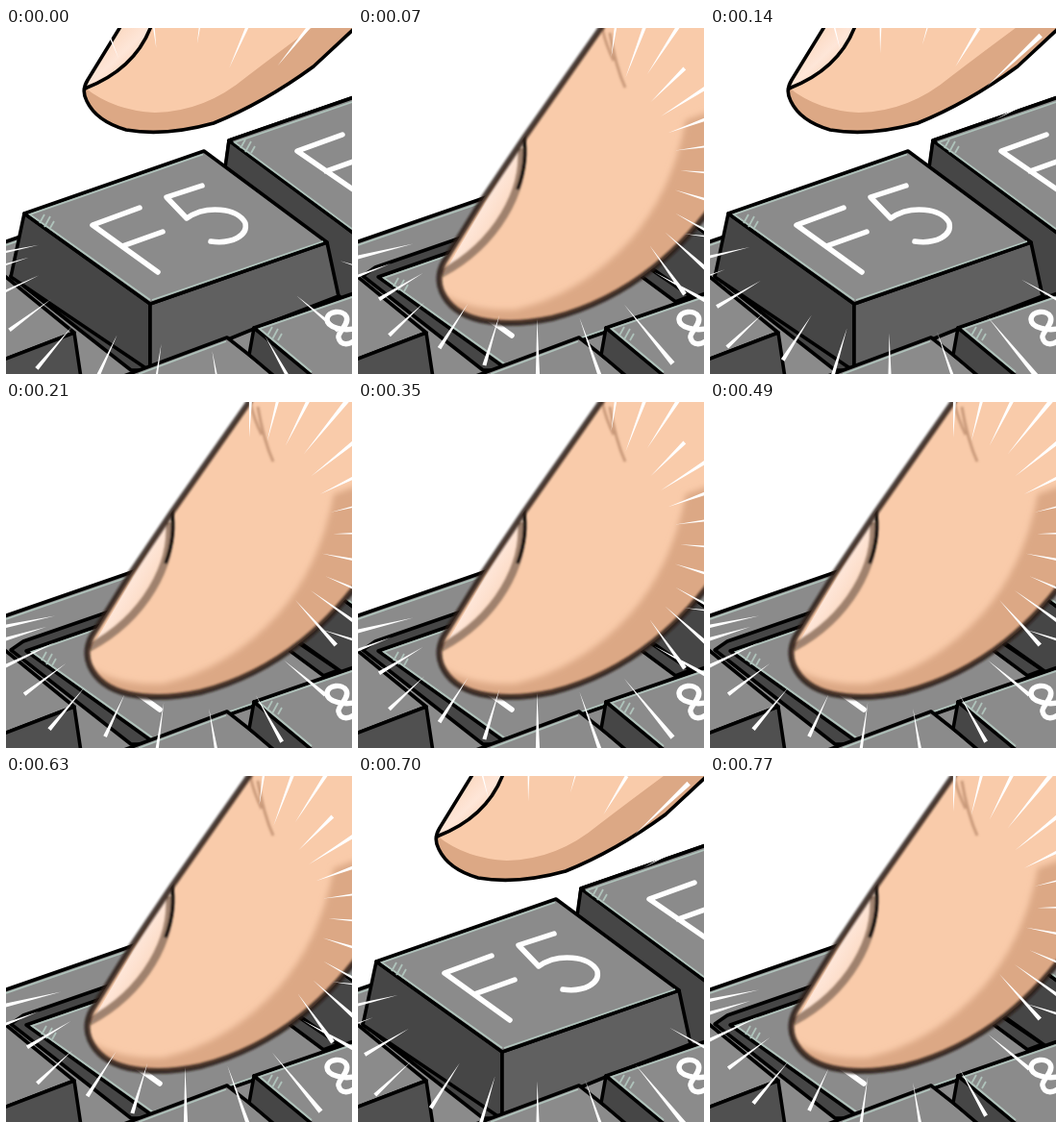
An HTML page that plays this animation: 360 px wide and 360 px high, repeating every 0.84 s.

```html
<!DOCTYPE html>
<html lang="en">
<head>
<meta charset="utf-8">
<title>Refresh key</title>
<style>
  html, body { margin: 0; width: 100%; height: 100%; overflow: hidden; background: #fff; }
  svg { display: block; width: 100vw; height: 100vh; }
  .ink { stroke: #000; stroke-width: 3.6; stroke-linejoin: round; stroke-linecap: round; }
  .line { fill: none; }
  .top { fill: #8b8b8b; }
  .front { fill: #606060; }
  .side { fill: #464646; }
  .shine { fill: none; stroke: #afc3bb; stroke-width: 1.8; }
  .glyph { fill: none; stroke: #fff; stroke-width: 5.5; stroke-linecap: round; stroke-linejoin: round; }
  .skin { fill: #f9cbaa; }
  .shade { fill: #dca885; }
</style>
</head>
<body>
<svg viewBox="0 0 360 360">
  <defs>
    <linearGradient id="nail" x1="0" y1="0" x2="1" y2="1">
      <stop offset=".2" stop-color="#fbd5bb"/>
      <stop offset=".5" stop-color="#fee6d8"/>
      <stop offset=".85" stop-color="#f9cbaa"/>
    </linearGradient>
    <filter id="soft"><feGaussianBlur stdDeviation="1.2"/></filter>
    <filter id="softer"><feGaussianBlur stdDeviation="3"/></filter>
    <path id="upShape" d="M128-16 L85 54 Q78 65 84 76 Q94 97 125 106 Q166 113 216 99 Q268 78 320 40 L380 -16Z"/>
    <path id="downShape" d="M264-16 L173 114 L130 178 L89 244 Q81 259 87 274 Q97 297 128 304 Q160 311 202 302 Q260 287 308 249 Q345 220 380 170 V-16Z"/>
    <clipPath id="upClip"><use href="#upShape"/></clipPath>
    <clipPath id="downClip"><use href="#downShape"/></clipPath>
    <path id="hatch" class="shine" stroke-width="2.500" d="M0 9 L5 0 M5 13 L11 2 M11 14 L15 7"/>
    <g id="cap">
      <path class="ink top" d="M19 193 L206 128 L334 223 L150 287Z"/>
      <path class="shine" d="M150 283 L25 194 L205 131.500 M152 283 L330 222"/>
      <use href="#hatch" x="35" y="194"/>
      <path class="glyph" d="M158 254 L90 205 L139 187 M121 227 L163 212 M204 164 L167 176 L188 198 C208 184 241 187 249 203 C252 216 235 225 213 222"/>
    </g>
  </defs>

  <!-- neighbouring keys and the well -->
  <path class="ink top" d="M-5 224 L229 143 L232 117 L365 71 V365 H-5Z"/>
  <path class="shine" d="M0 226 L206 155"/>
  <path class="ink side" d="M5 258 L18 249 L206 184 L346 279 L258 312 L150 356 L130 356Z"/>
  <path class="ink side" d="M232 117 L228 145 L226 190 L300 246 L365 292 V216Z"/>
  <path class="ink top" d="M232 117 L365 71 V216Z"/>
  <path class="shine" d="M360 209 L238 119 L360 77"/>
  <use href="#hatch" x="244" y="116"/>
  <path class="glyph" d="M364 170 L303 128 L350 111 M333 149 L364 138"/>

  <g id="keyUp">
    <path class="ink side" d="M19 193 L150 287 V357 L5 259Z"/>
    <path class="ink front" d="M150 287 L334 223 L346 279 L258 313 L150 357Z"/>
    <use href="#cap"/>
  </g>
  <use id="keyDown" href="#cap" x="2" y="66"/>

  <!-- front row -->
  <path class="ink top" d="M-5 255 L71 317 L-5 346Z"/>
  <path class="ink" fill="#505050" d="M-5 346 L71 317 L78 364 H-5Z"/>
  <path class="ink top" d="M120 363 L230 322 L282 363Z"/>
  <path class="shine" d="M138 360 L229 326"/>
  <path class="ink side" d="M258 312 L253 340 L280 363 H325Z"/>
  <path class="ink top" d="M258 312 L365 275 V365 H322Z"/>
  <path class="shine" d="M318 358 L264 313 L360 280"/>
  <use href="#hatch" x="272" y="311"/>
  <path class="glyph" d="M366 312 C352 316 334 312 334 303 C335 294 350 293 354 300 C358 308 345 316 346 322 C348 331 358 331 366 322"/>

  <g id="fingerUp">
    <use href="#upShape" class="skin"/>
    <g clip-path="url(#upClip)">
      <path class="shade" d="M82 62 Q112 86 155 88 Q207 87 250 51 Q288 22 322-3 H370 V120 H78Z"/>
      <path fill="url(#nail)" d="M119-2 L82 63 Q134 43 151-2Z"/>
      <path class="ink line" d="M82 63 Q134 43 151-2"/>
    </g>
    <use href="#upShape" class="ink line"/>
  </g>

  <g id="fingerDown">
    <use href="#downShape" class="skin"/>
    <g clip-path="url(#downClip)">
      <path class="shade" filter="url(#softer)" d="M78 270 Q112 296 164 293 Q232 277 283 221 Q327 171 341 96 L380 82 V330 H78Z"/>
      <path fill="url(#nail)" d="M172 113 C180 165 150 225 88 258Z"/>
      <g class="line" filter="url(#soft)">
        <path stroke="#8f715d" stroke-width="8" opacity=".85" d="M170 125 C174 168 146 224 86 256"/>
        <path stroke="#000" stroke-width="3.500" d="M172 111 Q177 138 166 168"/>
        <path stroke="#c99a7a" stroke-width="3" d="M254 0 Q258 18 266 34 M262 5 Q268 40 278 62"/>
      </g>
    </g>
    <use href="#downShape" class="line" stroke="#2a1c14" stroke-width="6" opacity=".85" filter="url(#soft)"/>
  </g>

  <path id="rays" fill="#fff"/>
</svg>
<script>
  const STEP = 70;
  const el = id => document.getElementById(id);
  const noise = n => Math.abs(Math.sin(n * 127.1) * 43758.5) % 1;

  // Fans of rays around an ellipse, angles in degrees; bend crowds rays at the start.
  const keyFan = { x: 185, y: 200, rx: 142, ry: 112, from: 168, to: 18, count: 11, bend: 1.5 };
  const fans = {
    up: [
      { ...keyFan, rx: 160, ry: 128 },
      { x: 175, y: 150, rx: 150, ry: 124, from: -112, to: -36, count: 6, bend: 1 }
    ],
    down: [
      keyFan,
      { x: 250, y: 140, rx: 84, ry: 98, from: -88, to: 48, count: 12, bend: 1 }
    ]
  };

  function ray(fan, i, shift) {
    const t = (i + shift) / (fan.count - 1);
    const angle = (fan.from + (fan.to - fan.from) * t ** fan.bend) * Math.PI / 180;
    const jitter = noise(i + shift + fan.count);
    const cos = Math.cos(angle), sin = Math.sin(angle);
    const scale = 0.9 + 0.25 * jitter;
    const x = fan.x + fan.rx * scale * cos, y = fan.y + fan.ry * scale * sin;
    const length = 45 + 35 * noise(jitter * 9 + i);
    const half = 1 + length * 0.02;
    const u = x + length * cos, v = y + length * sin;
    return `M${x} ${y}L${u - half * sin} ${v + half * cos}L${u + half * sin} ${v - half * cos}Z`;
  }

  const burst = (pose, shift) => fans[pose].map(fan =>
    Array.from({ length: fan.count }, (_, i) => ray(fan, i, shift)).join('')).join('');

  const bursts = [burst('up', 0), burst('down', 0.5), burst('up', 0.5), burst('down', 0)];
  const show = (id, on) => el(id).style.display = on ? '' : 'none';

  function draw() {
    const step = Math.floor(performance.now() / STEP) % 4;
    const pressed = step % 2 === 1;
    show('keyUp', !pressed);
    show('fingerUp', !pressed);
    show('keyDown', pressed);
    show('fingerDown', pressed);
    el('rays').setAttribute('d', bursts[step]);
    requestAnimationFrame(draw);
  }
  draw();
</script>
</body>
</html>
```
